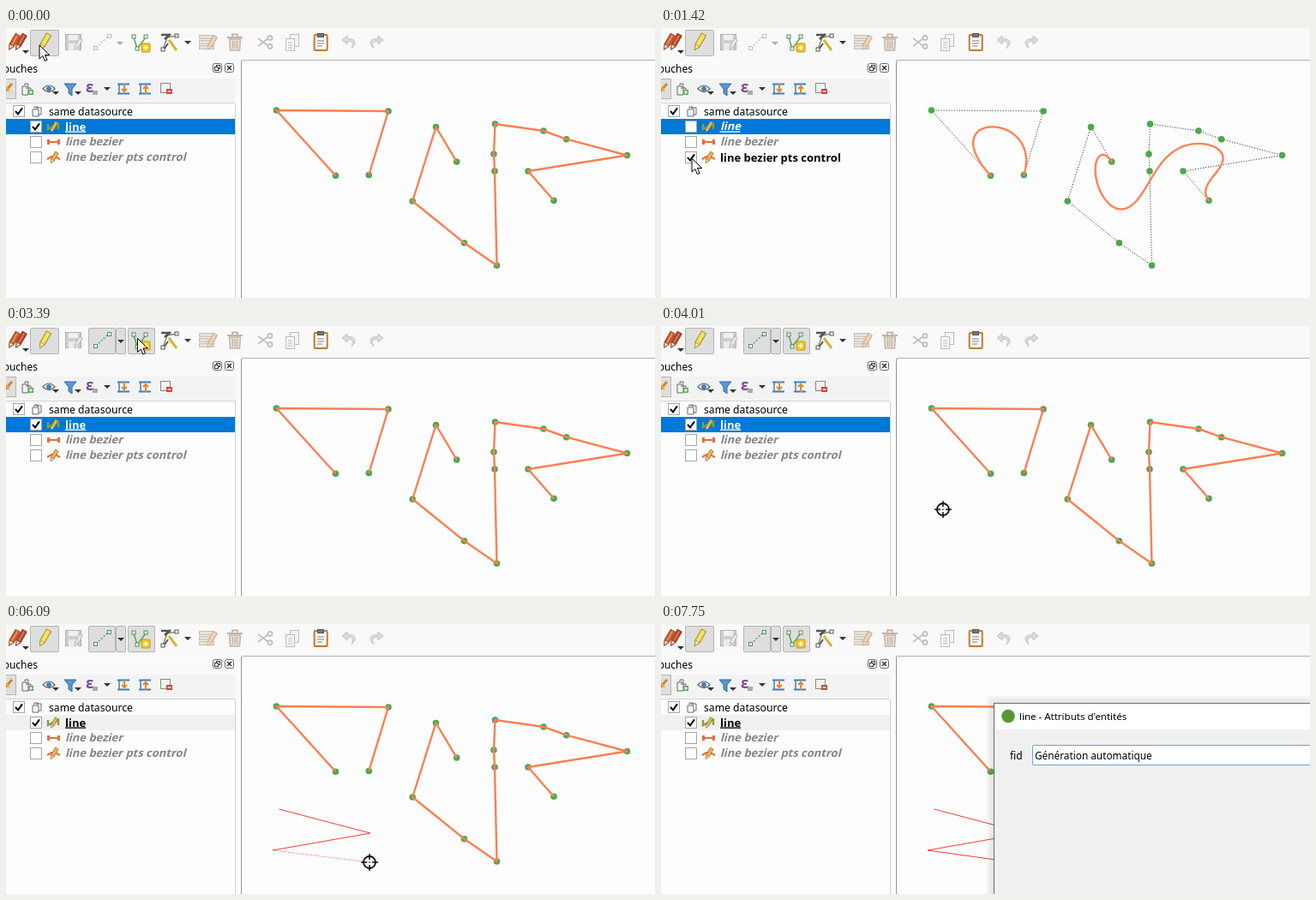
Write an HTML page that moves like this. It is 757 by 315 pixels and loops after 8 s.

```html
<!DOCTYPE html>
<html lang="fr">
<head>
<meta charset="utf-8">
<style>
  html, body { margin: 0; width: 100%; height: 100%; overflow: hidden; background: #fdfdfd; }
  svg { display: block; width: 757px; height: 315px; font: 12.2px "Noto Sans", sans-serif; }
  .name { font-weight: bold; font-size: 13px; }
  .off { transform: skewX(-14deg); transform-box: fill-box; transform-origin: 0 75%; }
</style>
</head>
<body>
<svg id="stage" viewBox="0 0 757 315"></svg>
<script>
const LOOP = 8000;
const GREEN = '#4ba84e', ORANGE = '#fb8358', GREY = '#bdbdbd', BLUE = '#3f7fc1';

const lines = [
  [[384.5, 172.3], [315.5, 96], [446, 97], [423.3, 171.5]],
  [[525.7, 156], [501.5, 115.5], [474.2, 202], [534.5, 250.7], [572.5, 277], [570, 167], [569, 147],
   [570.5, 112], [627, 120], [653.7, 129.7], [724.5, 148.5], [609, 167], [639, 201.3]],
];
const sketch = [[318.5, 216], [425, 244], [311, 264], [426, 280]];
const clicks = [4280, 4980, 5680, 6400];

// Pointer path: time, x, y
const pointer = [
  [90, 39, 20], [270, 38, 129], [450, 38, 129], [630, 36, 130], [810, 36, 130], [900, 36, 115],
  [1000, 36, 115], [1200, 36, 152], [1690, 36, 152], [2000, 33, 115], [2480, 33, 115],
  [2850, 120, 60], [3110, 153, 14], [3390, 153, 14], [3800, 336, 208], [3920, 336, 215],
  [4010, 329, 214], [4190, 318, 216], [4370, 318, 216], [4960, 425, 244], [5050, 425, 244],
  [5090, 419, 244], [5500, 311, 264], [5730, 311, 264], [5820, 340, 270], [6090, 424, 278],
  [6270, 426, 280], [6450, 426, 280], [6630, 474, 254],
];

// --- drawing helpers ---
const rect = (x, y, w, h, fill, stroke = 'none', extra = '') =>
  `<rect x="${x}" y="${y}" width="${w}" height="${h}" fill="${fill}" stroke="${stroke}" ${extra}/>`;
const path = (d, stroke, width = 1, fill = 'none', extra = '') =>
  `<path d="${d}" stroke="${stroke}" stroke-width="${width}" fill="${fill}" ${extra}/>`;
const label = (x, y, text, extra = '') => `<text x="${x}" y="${y}" ${extra}>${text}</text>`;
const at = (x, y, body, turn = '') => `<g transform="translate(${x} ${y}) ${turn}">${body}</g>`;
const group = (id, body) => `<g id="${id}">${body}</g>`;
const polyline = pts => 'M' + pts.map(p => p.join(' ')).join('L');
const dots = pts => pts.map(([x, y]) => `<circle cx="${x}" cy="${y}" r="3.8" fill="${GREEN}"/>`).join('');
const arrow = (x, y, color = '#333') => path(`M${x - 4} ${y - 2}h8l-4 4z`, 'none', 0, color);
const pencil = (x, y, color, edge, size = 1) => at(x, y,
  path('M-3 -10h6v15l-3 6l-3 -6z', edge, 1, color) + path('M-3 5h6l-3 6z', edge, .7, '#f4e3c2') +
  path('M0 -9v13', '#fff', 1, 'none', 'opacity=".45"'), `rotate(30) scale(${size})`);
const button = (x, w) => rect(x + .5, 2.5, w, 30, '#dedede', '#b4b4b4', 'rx="1.5"');

// Single Bézier curve over all control points (de Casteljau)
function bezier(pts) {
  const out = [];
  for (let i = 0; i <= 80; i++) {
    let p = pts;
    while (p.length > 1)
      p = p.slice(1).map((b, k) => [0, 1].map(c => p[k][c] + (b[c] - p[k][c]) * i / 80));
    out.push(p[0].map(v => +v.toFixed(1)));
  }
  return polyline(out);
}

function segmentTool(color) {
  return path('M105 23L119 10', color, 1.3, 'none', 'stroke-dasharray="2 2"') +
    rect(102.5, 21.5, 4, 4, '#fff', color) + rect(118.5, 7.5, 4, 4, '#fff', color);
}

function toolbar() {
  return rect(0, 0, 757, 37, '#f9f9f9') + path('M275 37.5H757', '#b0b0b0') +
    pencil(9, 16, '#d9652b', '#8d3a18', .95) + pencil(17, 16, '#c9481f', '#7d2f14', .95) + arrow(23, 28) +
    button(28, 33) + pencil(45, 16, '#f3dc4b', '#a8902a') +
    at(69, 7, rect(.5, .5, 18, 18, '#cfcfcf', '#b0b0b0') + rect(4, 1, 11, 6, '#f0f0f0') + rect(4, 11, 11, 8, '#ebebeb')) +
    pencil(84, 19, '#e2e2e2', '#b0b0b0', .7) +
    group('segmentOff', segmentTool(GREY) + arrow(133, 18, '#aaa')) +
    group('segmentOn', button(96, 31) + button(128, 11) + button(142, 31) + segmentTool('#4d9a57') + arrow(134, 18)) +
    path('M149 11L153 24L163 11', '#5aa05f', 1.5) +
    [[147, 8], [151, 22], [161, 8]].map(([x, y]) => rect(x, y, 4, 4, '#fff', '#4d8f53')).join('') +
    rect(158, 18, 10, 10, '#f1c81e', '#c49b12', 'rx="1"') + path('M163 20v6M160 23h6', '#fff', 1.5) +
    path('M183 25L188 11L199 9', '#7d8f5c', 1.4) + path('M190 14L199 26', '#d8b23c', 3) +
    path('M181 8h9M185 13l7 -6', '#555', 2.6) + path('M184 25l5 -7', '#555', 2) +
    rect(197, 7, 4, 4, '#fff', '#555') + rect(181, 23, 4, 4, '#fff', '#555') + arrow(212, 17) +
    at(225, 8, [0, 6, 12].map(y => rect(.5, y + .5, 17, 4, '#e6e1da', '#c9bdb0')).join('')) +
    pencil(240, 17, '#e9cdaa', '#c3a888', .85) +
    at(258, 7, path('M0 4h18M6 3V.5h6V3', '#c5b3a6', 1.8) + path('M2.5 6h13l-1 13h-11z', '#c5b3a6', 1.4, '#e6ddd6') +
      path('M6.5 8v9M9 8v9M11.5 8v9', '#c5b3a6', 1.2)) +
    at(293, 8, path('M1 4L13 13M1 13L13 4', '#c2c2c2', 1.8) +
      `<g fill="none" stroke="#c2c2c2" stroke-width="2"><circle cx="15" cy="3.5" r="2.5"/><circle cx="15" cy="13.5" r="2.5"/></g>`) +
    at(326, 7, rect(5.5, .5, 10, 14, '#f5f5f5', GREY) + rect(.5, 5.5, 10, 14, '#f5f5f5', GREY) + path('M3 10h5M3 13h5M3 16h5', GREY)) +
    at(359, 6, rect(.7, 2, 15, 18, '#fff', '#c07a2c', 'stroke-width="2" rx="1"') +
      rect(4.5, .5, 7, 4, '#777', '#555') + path('M4 9h8M4 12h8M4 15h6', '#777', 1.2)) +
    path('M398 9l-6 5l6 5v-3.2c6 -1 8 1 5 8c6 -5 6 -12 -5 -11z', '#c2c2c2', 1, '#dcdcdc') +
    path('M434 9l6 5l-6 5v-3.2c-6 -1 -8 1 -5 8c-6 -5 -6 -12 5 -11z', '#c2c2c2', 1, '#dcdcdc');
}

function panelHeader() {
  const tree = up => path('M0 1.5h14M0 12.5h14', BLUE, 2) + path('M2 2v10', BLUE, 1.5) +
    path(up ? 'M8 13V5M5 7l3 -3l3 3' : 'M8 1v8M5 7l3 3l3 -3', '#e08a2c', 2);
  return rect(0, 38, 274, 50, '#fafafa') + rect(0, 59, 267, 27, '#f3f3f3') +
    label(37, 51.5, 'Couches', 'text-anchor="end" font-size="12"') +
    at(241, 41, rect(.5, .5, 10, 10, '#fff', '#666', 'rx="2"') + rect(4.5, 2.5, 4, 4, 'none', '#333') + rect(2.5, 4.5, 4, 4, '#fff', '#333')) +
    at(255, 41, rect(.5, .5, 10, 10, '#fff', '#666', 'rx="2"') + path('M3 3l5 5M8 3l-5 5', '#222', 1.3)) +
    rect(-3.5, 59.5, 15, 23, '#dedede', '#b4b4b4') + path('M-1 74l8 -9', '#e0812c', 3) + path('M0 69l4 5', '#d8b23c', 2) +
    at(18, 64, path('M4 3V1h4v2M1 4h7v10h-7zM5 6h6v8', '#666') + rect(8, 8, 6, 6, '#62ab5c') + path('M11 9v4M9 11h4', '#fff')) +
    at(43, 64, path('M0 7Q7 -1 14 7Q7 14 0 7z', '#666', 1.2, '#fff') + '<circle cx="7" cy="7" r="3" fill="#4e7fae"/>') + arrow(58, 76) +
    path('M68 65h14l-5 6v8l-4 -3v-5z', '#2f6ba8', 1, '#5b97d0') + arrow(84, 76) +
    label(93, 75, 'ε', 'font-size="17" font-weight="bold" fill="#7b4a93"') + rect(101, 73, 6, 5, '#aaa') + arrow(118, 71) +
    at(130, 64, tree(false)) + at(155, 64, tree(true)) +
    rect(180.5, 64.5, 11, 11, '#f2f2f2', '#888') + rect(187, 71, 7, 6, '#d8423c') + path('M188.5 74h4', '#fff', 1.3);
}

const check = (x, y, id) => rect(x + .5, y + .5, 13, 13, '#fff', '#a6a6a6') +
  path(`M${x + 3} ${y + 7}l3 3.3l5 -7`, '#000', 2, 'none', `id="${id}"`);

function layers() {
  const ends = (y, c) => path(`M50 ${y}h12`, c, 2) + rect(48, y - 3, 3, 6, c) + rect(60, y - 3, 3, 6, c);
  return rect(0, 88, 267, 227, '#fdfdfd') + path('M0 87.5H267M267.5 88V315', '#d0d0d0') + path('M274.5 38V315', '#969696') +
    check(8, 90, 'checkRoot') +
    at(30, 91, path('M3 3V1h4v2M1 4h7v8h-7zM5 2h6v8h-3', '#666')) + label(50, 101.5, 'same datasource') +
    rect(0, 106, 267, 18, '#0078d7', 'none', 'id="row"') +
    check(28, 108, 'checkLine') + check(28, 126, 'checkBezier') + check(28, 144, 'checkControl') +
    path('M49 112v6l12 -6v6', '#7da343', 2.4) + pencil(56, 115, '#d8ae3c', '#8f7330', .62) +
    ends(133, '#e2703c') +
    path('M48 153l5 -3h4l6 3', '#e2703c', 2.2) + pencil(56, 151, '#eaa64a', '#a86826', .68) +
    label(69, 119.5, 'line', 'id="nameLine" class="name" text-decoration="underline"') +
    label(69, 137.5, 'line bezier', 'class="name off" fill="#858585"') +
    label(69, 155.5, 'line bezier pts control', 'id="nameControl" class="name"');
}

const mapLine = lines.map(p => dots(p) + path(polyline(p), ORANGE, 2.4, 'none', 'stroke-linejoin="round"') +
  path(polyline(p), '#ee6a38', 1.2, 'none', 'stroke-dasharray="1 2" opacity=".6"')).join('');
const mapControl = lines.map(p => path(polyline(p), '#111', 1, 'none', 'stroke-dasharray="1 2"') +
  dots(p) + path(bezier(p), ORANGE, 2.4, 'none', 'stroke-linecap="round"')).join('');

const shadow = [9, 6, 3].map(d => rect(389 - d, 93 - d, 400, 300, '#000', 'none', 'opacity=".035" rx="4"')).join('');
const dialog = shadow +
  rect(388.5, 92.5, 380, 230, '#f0f0f0', '#6e6e6e') + rect(389, 93, 370, 30, '#fff') +
  '<circle cx="405" cy="107.5" r="7.8" fill="#589632"/>' +
  label(418, 111.5, "line - Attributs d'entités", 'font-size="11.5"') +
  label(407, 157.5, 'fid', 'font-size="12"') + rect(433.5, 141.5, 340, 23, '#fff', '#5aa9e6', 'rx="1.5"') +
  label(436, 157.5, 'Génération automatique', 'font-size="11.8"') + rect(573, 145, 1, 16, '#000', 'none', 'id="caret"');

document.getElementById('stage').innerHTML = rect(0, 0, 757, 315, '#fdfdfd') +
  toolbar() + panelHeader() + layers() +
  group('mapLine', mapLine) + group('mapControl', mapControl) +
  path('', '#f23c3c', 1, 'none', 'id="drawn"') +
  path('', '#f23c3c', 1, 'none', 'id="rubber" stroke-dasharray="1 2"') +
  group('hand', path('M0 0v16l3.8 -3.5l2.5 6l2.7 -1.2l-2.5 -5.8h5.2z', '#000', 1, '#fff')) +
  group('cross', '<circle r="7" fill="none" stroke="#111" stroke-width="1.8"/>' +
    path('M-10 0h7M3 0h7M0 -10v7M0 3v7', '#111', 1.5) + rect(-.7, -.7, 1.4, 1.4, '#111')) +
  group('dialog', dialog);

// --- animation ---
const el = id => document.getElementById(id);
const show = (id, on) => el(id).style.display = on ? '' : 'none';

function pointerAt(t) {
  const i = pointer.findIndex(k => k[0] > t);
  if (i < 0) return pointer[pointer.length - 1].slice(1);
  if (i === 0) return pointer[0].slice(1);
  const [t0, x0, y0] = pointer[i - 1], [t1, x1, y1] = pointer[i], u = (t - t0) / (t1 - t0);
  return [x0 + (x1 - x0) * u, y0 + (y1 - y0) * u];
}

function draw(t) {
  const lineOn = t < 950 || t >= 2050;
  const controlOn = t >= 1200 && t < 1520;
  const focused = t < clicks[0];
  show('checkLine', lineOn);
  show('checkBezier', false);
  show('checkControl', controlOn);
  show('mapLine', t < 1240 || t >= 2050);
  show('mapControl', t >= 1240 && t < 1520);
  el('row').setAttribute('fill', focused ? '#0078d7' : '#f0f0f0');
  el('nameLine').setAttribute('fill', focused ? '#fff' : '#000');
  el('nameLine').setAttribute('class', lineOn ? 'name' : 'name off');
  el('nameControl').setAttribute('fill', controlOn ? '#000' : '#858585');
  el('nameControl').setAttribute('class', controlOn ? 'name' : 'name off');
  show('segmentOff', t < 3390);
  show('segmentOn', t >= 3390);

  const [x, y] = pointerAt(t), onMap = x > 275;
  show('hand', !onMap);
  show('cross', onMap);
  el(onMap ? 'cross' : 'hand').setAttribute('transform', `translate(${x} ${y})`);

  const fixed = sketch.slice(0, clicks.filter(c => t >= c).length);
  el('drawn').setAttribute('d', fixed.length > 1 ? polyline(fixed) : '');
  el('rubber').setAttribute('d', fixed.length ? polyline([fixed[fixed.length - 1], [x, y]]) : '');

  el('dialog').setAttribute('opacity', Math.min(1, Math.max(0, (t - 7150) / 350)));
  show('caret', t >= 7480 && t < 7750);
}

function tick() {
  draw(performance.now() % LOOP);
  requestAnimationFrame(tick);
}
tick();
</script>
</body>
</html>
```
